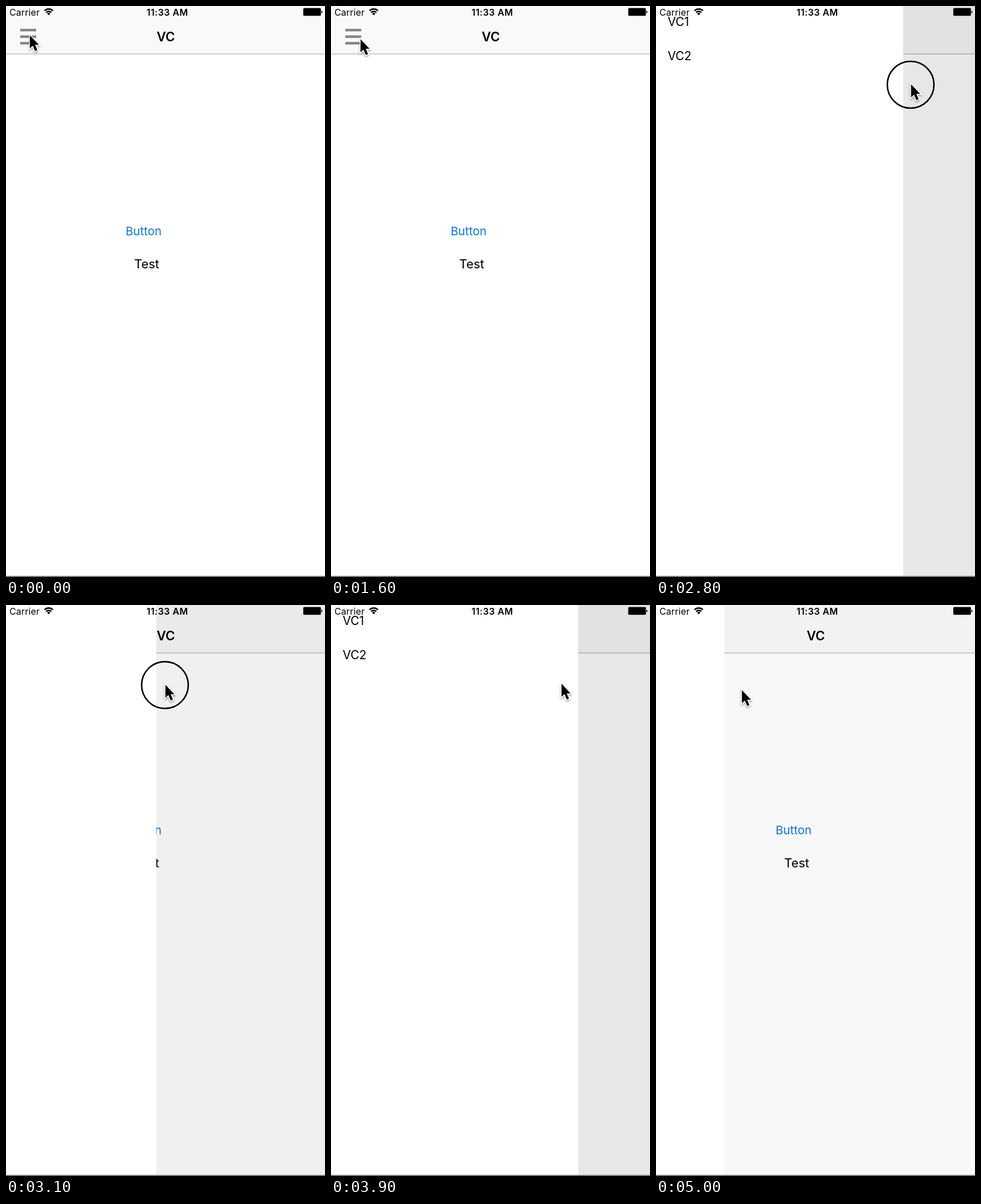
Recreate the animation shown at these times as an HTML page. Size 560 px wide and 1001 px high, loop 5100 ms.

```html
<!DOCTYPE html>
<html lang="en">
<head>
<meta charset="utf-8">
<title>Side menu</title>
<style>
  html, body { margin: 0; width: 100%; height: 100%; overflow: hidden; background: #fff; }
  svg { display: block; width: 560px; height: 1001px; }
  text { font-family: Inter, Roboto, sans-serif; fill: #000; }
  .mid { text-anchor: middle; }
</style>
</head>
<body>
<svg viewBox="0 0 560 1001">
  <defs>
    <filter id="shadow" x="-50%" y="-50%" width="200%" height="200%">
      <feDropShadow dx="0" dy="2" stdDeviation="1.5" flood-color="#000" flood-opacity=".4"/>
    </filter>
  </defs>

  <!-- main screen -->
  <rect width="560" height="1001" fill="#fff"/>
  <rect width="560" height="84" fill="#f9f9f9"/>
  <rect y="83.5" width="560" height="1.2" fill="#b2b2b2"/>
  <path d="M25 42.3h28M25 53.8h28M25 65.2h28" stroke="#858585" stroke-width="4.6"/>
  <text class="mid" x="280.5" y="62" font-size="22.5" font-weight="600">VC</text>
  <text class="mid" x="241.5" y="402" font-size="20.5" style="fill:#0b78e0">Button</text>
  <text class="mid" x="247" y="460" font-size="22">Test</text>
  <rect id="dim" width="560" height="1001"/>

  <!-- side menu -->
  <rect id="panel" height="1001" fill="#fff"/>
  <g id="items" font-size="21">
    <text x="20.5" y="34.5">VC1</text>
    <text x="20.5" y="94.5">VC2</text>
  </g>

  <!-- status bar -->
  <text x="6" y="16.5" font-size="16" letter-spacing=".1">Carrier</text>
  <path d="M67.6 8.3a10.6 10.6 0 0 1 14.8 0M70.4 11.4a6.6 6.6 0 0 1 9.2 0"
        fill="none" stroke="#000" stroke-width="2.5"/>
  <path d="M72.2 13.4a4.1 4.1 0 0 1 5.6 0L75 16.3z"/>
  <text class="mid" x="283.2" y="16.5" font-size="16" font-weight="600" letter-spacing=".45">11:33 AM</text>
  <rect x="522" y="3.7" width="30.6" height="13.4" rx="1.5" stroke="#000" stroke-opacity=".4" stroke-width=".8"/>
  <path d="M553.6 8a2.6 2.6 0 0 1 0 5z"/>

  <rect y="999" width="560" height="2" fill="#7c7c7c"/>

  <!-- pointer -->
  <circle id="ring" r="41" fill="none" stroke="#000" stroke-width="2.6"/>
  <path id="arrow" d="M0 0V23L5.2 18.2L9.3 27.6L13.2 25.9L9.2 16.8H16z"
        stroke="#fff" stroke-width="3" paint-order="stroke" filter="url(#shadow)"/>
</svg>

<script>
const LOOP = 5100, STEP = 100, OPEN = 434;

// Each move: start, end, then the place it reaches. Between moves all rests.
const cursorMoves = [
  [0, 100, 36, 51],
  [400, 800, 450, 158],
  [900, 1000, 428, 140],
  [1000, 1600, 51, 56],
  [1700, 1800, 45, 54],
  [2000, 2500, 445, 139],
  [2500, 2800, 447, 135],
  [2800, 2900, 443, 135],
  [2900, 3300, 25, 141],
  [3600, 3700, 365, 135],
  [3700, 4100, 464, 137],
  [4400, 5000, 150, 147]
];
const panelMoves = [
  [2005, 2309, OPEN],
  [2900, 3300, 0],
  [3600, 3700, 371],
  [3700, 3900, OPEN],
  [4500, 5000, 120]
];
const presses = [[1800, 2000], [2700, 3100], [4400, 4900]];

const [dim, panel, items, ring, arrow] =
  ["dim", "panel", "items", "ring", "arrow"].map(id => document.getElementById(id));

const clamp = k => Math.min(1, Math.max(0, k));
const ease = k => k ** 1.35;

function follow(from, moves, t) {
  return moves.reduce((pos, [start, end, ...to]) => {
    const k = ease(clamp((t - start) / (end - start)));
    return pos.map((v, i) => v + (to[i] - v) * k);
  }, from);
}

function draw(time) {
  const t = Math.floor((time % LOOP) / STEP) * STEP;
  const [x, y] = follow([41, 49], cursorMoves, t);
  const [width] = follow([0], panelMoves, t);
  const pressed = presses.some(([from, to]) => t >= from && t <= to);

  dim.setAttribute("opacity", 0.095 * width / OPEN);
  panel.setAttribute("width", width);
  items.style.display = width >= OPEN ? "" : "none";
  ring.style.display = pressed ? "" : "none";
  ring.setAttribute("transform", `translate(${x} ${y + 3})`);
  arrow.setAttribute("transform", `translate(${x + 0.8} ${y + 2.3})`);
}

const start = performance.now();
function tick() {
  draw(performance.now() - start);
  requestAnimationFrame(tick);
}
tick();
</script>
</body>
</html>
```
